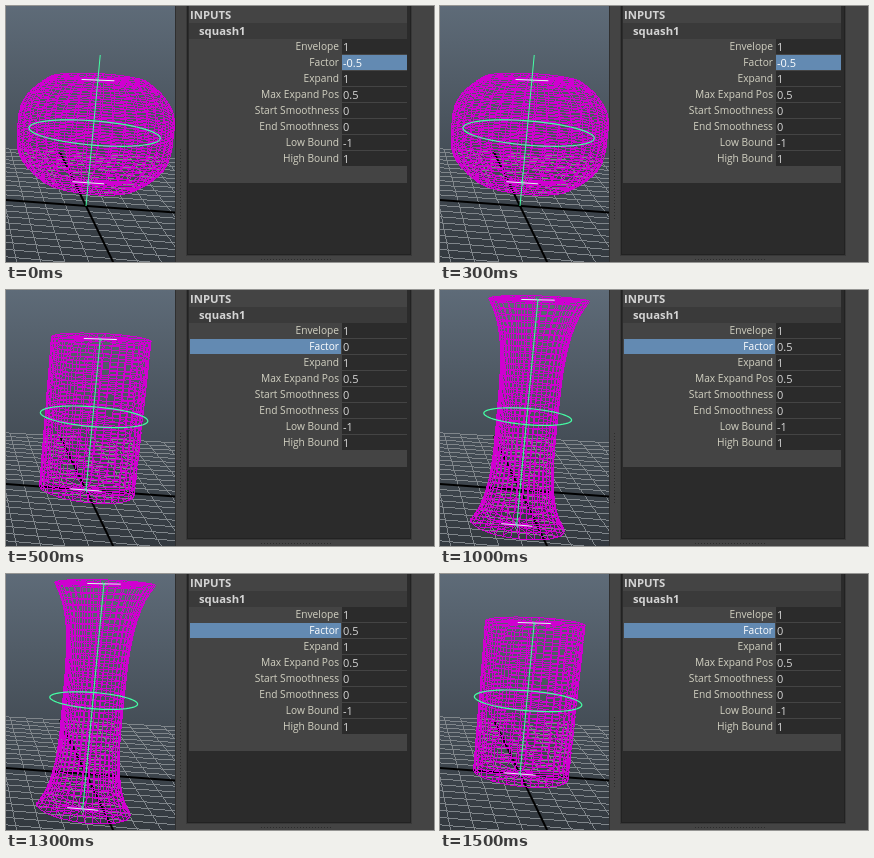
Animation of 428 by 256 pixels, one loop 2000 ms. Source, as an HTML page with a canvas:

```html
<!DOCTYPE html>
<html lang="en">
<head>
<meta charset="utf-8">
<title>Squash factor</title>
<style>
  html, body { margin: 0; width: 100%; height: 100%; overflow: hidden; background: #444; }
  #stage { position: relative; width: 428px; height: 256px; overflow: hidden; background: #444;
    font: 11px/16px "Open Sans", "Noto Sans", sans-serif; color: #d2d1c2; white-space: nowrap; }
  #stage * { position: absolute; box-sizing: border-box; }
  #view { left: 0; top: 0; }
  #panel { left: 181px; top: -2px; width: 224px; height: 251px; background: #2b2b2b;
    border: 1px solid #222; box-shadow: 0 0 0 1px #383838; }
  #list { left: 1px; top: 1px; width: 218px; height: 177px; background: #444; }
  h1, h2 { margin: 0; font: bold 11.3px/16px "Open Sans", "Noto Sans", sans-serif; color: #d4d4d4; }
  h1 { left: 1px; top: 1px; }
  h2 { left: 0; top: 17px; width: 218px; height: 16px; padding-left: 10px; background: #3a3a3a; }
  .row { left: 0; width: 218px; height: 16px; }
  .row b { left: 1px; top: 0; width: 151px; height: 15px; padding-right: 2px; text-align: right;
    font-weight: normal; font-size: 10.2px; line-height: 15px; }
  .row i { left: 153px; top: 0; width: 65px; height: 15px; padding-left: 1px; font-style: normal;
    line-height: 15px; background: #2b2b2b; color: #d8d8d8; }
  .row .on { background: #638ab2; color: #fff; }
  .dots { background: radial-gradient(circle, #2c2c2c 0.7px, transparent 1px) 0 0 / 3px 3px; }
  #edge { left: 169px; top: 0; width: 1px; height: 256px; background: #2f2f2f; }
</style>
</head>
<body>
<div id="stage">
  <canvas id="view" width="169" height="256"></canvas>
  <div id="edge"></div>
  <div id="panel"><div id="list"><h1>INPUTS</h1><h2>squash1</h2></div></div>
  <div class="dots" style="left:173px;top:142px;width:4px;height:72px"></div>
  <div class="dots" style="left:254px;top:252px;width:72px;height:4px"></div>
</div>
<script>
const W = 169, H = 256, STEP = 500, TAU = Math.PI * 2;
const MAGENTA = '#d000d0', GREEN = '#45ffa5', GRID = '#80868b';

const attrs = [['Envelope', '1'], ['Factor', '-0.5'], ['Expand', '1'], ['Max Expand Pos', '0.5'],
  ['Start Smoothness', '0'], ['End Smoothness', '0'], ['Low Bound', '-1'], ['High Bound', '1']];

// half: half height, bulge: exponent of the waist, ring: radius of the handle circle
const poses = {
  squash: { factor: '-0.5', half: 0.34, bulge: 1, ring: 63.5, drop: 0.06, editing: true },
  rest: { factor: '0', half: 0.5, bulge: 0, ring: 52, drop: 0.12 },
  stretch: { factor: '0.5', half: 0.745, bulge: -1, ring: 42.5, drop: 0 }
};
const steps = [poses.squash, poses.rest, poses.stretch, poses.rest];

const list = document.getElementById('list');
const rows = attrs.map(([name, value], k) => {
  const row = document.createElement('div');
  row.className = 'row';
  row.style.top = 33 + k * 16 + 'px';
  row.innerHTML = `<b>${name}</b><i>${value}</i>`;
  list.append(row);
  return row;
});
const [label, field] = rows[1].children;

// Perspective of the ground plane (u, v) and height h
function project(u, v, h) {
  const d = 1 - 0.0057 * u + 0.0195 * v - 0.045 * h;
  return [(80 + 20.5 * u - 1.13 * v + 10 * h) / d,
          (200 + 0.4 * u - 1.65 * v - 153.2 * h) / d];
}

function onCircle(r, angle, h) {
  const s = r / 21;
  return project(s * Math.cos(angle), s * Math.sin(angle), h);
}

function stroke(g, points, color, width) {
  g.strokeStyle = color;
  g.lineWidth = width;
  g.beginPath();
  points.forEach(p => g.lineTo(p[0], p[1]));
  g.stroke();
}

// Hard-edged one pixel line
function pixelLine(g, a, b) {
  const dx = b[0] - a[0], dy = b[1] - a[1];
  const n = Math.max(1, Math.ceil(Math.max(Math.abs(dx), Math.abs(dy))));
  for (let k = 0; k <= n; k++) {
    g.fillRect(Math.floor(a[0] + dx * k / n), Math.floor(a[1] + dy * k / n), 1, 1);
  }
}

function drawGrid(g) {
  g.fillStyle = GRID;
  for (let k = -12; k <= 12; k++) {
    pixelLine(g, project(-12, k, 0), project(12, k, 0));
    pixelLine(g, project(k, -12, 0), project(k, 12, 0));
  }
  stroke(g, [project(-12, 0, 0), project(12, 0, 0)], '#000', 2);
  stroke(g, [project(0, -12, 0), project(0, 12, 0)], '#000', 2);
}

function drawMesh(g, pose) {
  const cols = 38, levels = 38;
  let seed = 7;
  const random = () => (seed = seed * 16807 % 2147483647) / 2147483647;
  const vertex = (c, l) => {
    const t = l / levels * 2 - 1;
    const r = 47 * Math.pow(1.6, pose.bulge * (1 - Math.pow(Math.abs(t), 3.4)));
    return onCircle(r, c / cols * TAU, 0.5 + pose.half * t);
  };
  g.fillStyle = MAGENTA;
  for (let l = 0; l <= levels; l++) {
    const rim = l === 0 || l === levels;
    for (let c = 0; c < cols; c++) {
      const p = vertex(c, l);
      if (rim || random() >= pose.drop) pixelLine(g, p, vertex(c + 1, l));
      if (l < levels && random() >= pose.drop) pixelLine(g, p, vertex(c, l + 1));
      if (rim && c % 2 === 0) pixelLine(g, p, project(0, 0, 0.5 + pose.half * (l ? 1 : -1)));
    }
  }
}

function drawHandle(g, pose) {
  const circle = [];
  for (let k = 0; k <= 64; k++) circle.push(onCircle(pose.ring, k / 64 * TAU, 0.5));
  stroke(g, circle, GREEN, 1.2);
  const reach = Math.max(0.5, pose.half);
  stroke(g, [project(0, 0, 0.5 - reach), project(0, 0, 0.5 + reach)], GREEN, 1);
  for (const side of [-1, 1]) {
    const h = 0.5 + side * pose.half;
    stroke(g, [project(-0.75, 0, h), project(0.75, 0, h)], '#d8ffea', 1);
    stroke(g, [project(0, -0.5, h), project(0, 0.5, h)], GREEN, 1);
  }
}

function render(pose) {
  const layer = document.createElement('canvas');
  layer.width = W;
  layer.height = H;
  const g = layer.getContext('2d');
  const sky = g.createLinearGradient(0, 0, 0, H);
  sky.addColorStop(0, '#5e6b78');
  sky.addColorStop(1, '#33393f');
  g.fillStyle = sky;
  g.fillRect(0, 0, W, H);
  drawGrid(g);
  drawMesh(g, pose);
  drawHandle(g, pose);
  return layer;
}

for (const pose of Object.values(poses)) pose.layer = render(pose);

const view = document.getElementById('view').getContext('2d');
let shown = null;

function tick() {
  const pose = steps[Math.floor(performance.now() / STEP) % steps.length];
  if (pose !== shown) {
    shown = pose;
    view.drawImage(pose.layer, 0, 0);
    field.textContent = pose.factor;
    field.classList.toggle('on', !!pose.editing);
    label.classList.toggle('on', !pose.editing);
  }
  requestAnimationFrame(tick);
}
tick();
</script>
</body>
</html>
```
